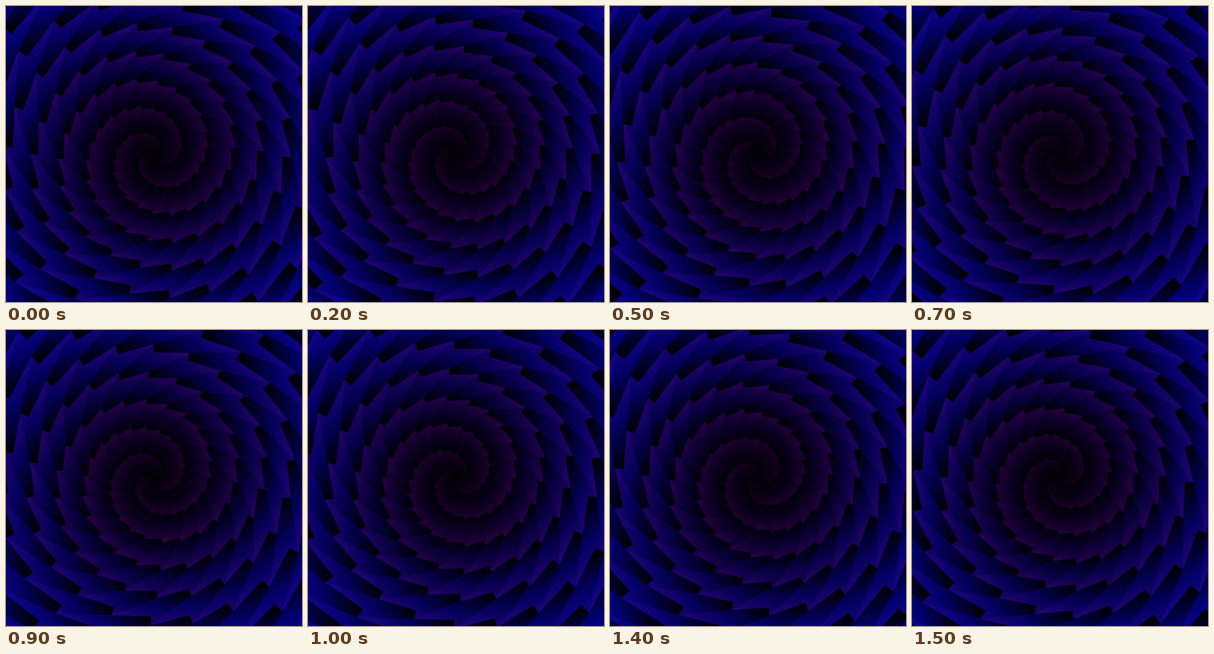
Recreate the animation shown at these times as an HTML page with a canvas. Size 500 by 500 pixels, loop 1.6 s.

```html
<!DOCTYPE html>
<html lang="en">
<head>
<meta charset="utf-8">
<title>Spiral tunnel</title>
<style>
html, body { margin: 0; width: 100%; height: 100%; overflow: hidden; background: #000; }
canvas { display: block; width: 500px; height: 500px; }
</style>
</head>
<body>
<canvas id="stage" width="500" height="500"></canvas>
<script>
const ctx = document.getElementById('stage').getContext('2d');
const LOOP = 1600, STEPS = 16;
const TURN = 114.67;              // degrees between neighbours on the spiral
const GAP = 2.1, INNER = -12;     // growth of the radius per neighbour, first radius
const SHIFT = 47;                 // neighbours passed in one loop
const SPIN = SHIFT * TURN - 15 * 360;
const START = 19.6;
const NOTCH = 0.94;               // inner end of a tile's dark edge

// radius, red, green, blue
const TIP = [[-35, 2, 0, 4], [8, 27, 0, 38], [80, 41, 0, 64], [190, 38, 4, 112], [320, 20, 5, 150]];
const MID = [[-35, 0, 0, 2], [8, 11, 0, 19], [80, 13, 0, 40], [190, 5, 0, 84], [320, 0, 0, 114]];

function ramp(stops, r) {
  let i = 1;
  while (i < stops.length - 1 && r > stops[i][0]) i++;
  const a = stops[i - 1], b = stops[i];
  const k = Math.min(1, Math.max(0, (r - a[0]) / (b[0] - a[0])));
  const [x, y, z] = [1, 2, 3].map(c => Math.round(a[c] + (b[c] - a[c]) * k));
  return `rgb(${x},${y},${z})`;
}

// Gradient that is 0 at o, u at point a and 1 at point b
function shade(o, a, b, u, r) {
  const ax = a[0] - o[0], ay = a[1] - o[1];
  const bx = b[0] - o[0], by = b[1] - o[1];
  const det = ax * by - ay * bx;
  const gx = (u * by - ay) / det, gy = (ax - u * bx) / det;
  const g2 = gx * gx + gy * gy;
  const fill = ctx.createLinearGradient(o[0], o[1], o[0] + gx / g2, o[1] + gy / g2);
  fill.addColorStop(0, 'rgb(0,0,7)');
  fill.addColorStop(0.55, ramp(MID, r));
  fill.addColorStop(1, ramp(TIP, r));
  return fill;
}

function draw(phase) {
  const flow = SHIFT * phase, spin = START + SPIN * phase;
  const radius = n => GAP * (n + flow) + INNER;
  const point = (n, scale = 1) => {
    const a = (n * TURN + spin) * Math.PI / 180;
    const r = Math.max(0, radius(n)) * scale;
    return [250 + r * Math.cos(a), 250 + r * Math.sin(a)];
  };

  ctx.fillStyle = '#000';
  ctx.fillRect(0, 0, 500, 500);
  ctx.lineWidth = 0.7;
  ctx.lineJoin = 'round';

  for (let n = Math.ceil(-9 - flow); n + flow < 200; n++) {
    const base = point(n), notch = point(n, NOTCH);
    const side = point(n + 19), tip = point(n + 16);
    const foot = [(base[0] + notch[0]) / 2, (base[1] + notch[1]) / 2];
    const shape = [base, side, point(n + 19, NOTCH), tip, point(n - 3), notch];
    ctx.beginPath();
    shape.forEach(p => ctx.lineTo(p[0], p[1]));
    ctx.closePath();
    ctx.fillStyle = ctx.strokeStyle = shade(foot, side, tip, 0.88, radius(n));
    ctx.fill();
    ctx.stroke();
  }
}

let last = -1;
function tick() {
  const step = Math.floor(performance.now() % LOOP / (LOOP / STEPS));
  if (step !== last) draw(step / STEPS);
  last = step;
  requestAnimationFrame(tick);
}
tick();
</script>
</body>
</html>
```
